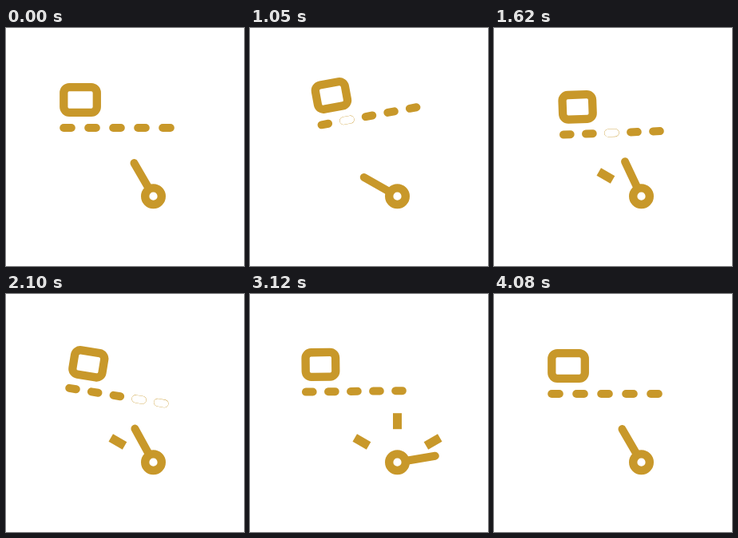
Write an HTML page with a canvas that moves like this. It is 298x298 px and loops after 4.5 s.

```html
<!DOCTYPE html>
<html lang="en">
<head>
<meta charset="utf-8">
<title>Box and gauge</title>
<style>
html, body { margin: 0; width: 100%; height: 100%; overflow: hidden; background: #fff; }
canvas { display: block; width: 100vw; height: 100vh; }
</style>
</head>
<body>
<canvas width="298" height="298"></canvas>
<script>
const ctx = document.querySelector('canvas').getContext('2d');
const GOLD = '#c8982a';
const LOOP = 4500, STEP = 30, START = 330, END = 3900;
const rad = degrees => degrees * Math.PI / 180;

const easeInOut = u => (1 - Math.cos(Math.PI * u)) / 2;
const easeIn = u => u ** 1.25;
const easeOut = u => Math.sin(Math.PI * u / 2);

// Each point is [time, value, easing on the way there].
function track(...points) {
  return t => {
    const next = points.findIndex(point => point[0] > t);
    if (next === 0) return points[0][1];
    if (next < 0) return points[points.length - 1][1];
    const [t0, v0] = points[next - 1];
    const [t1, v1, ease = easeInOut] = points[next];
    return v0 + (v1 - v0) * ease((t - t0) / (t1 - t0));
  };
}

const lineX = track([START, 139], [840, 149], [1350, 149], [2790, 130], [3540, 131], [END, 139]);
const lineY = track([START, 125], [1000, 110], [1700, 132], [1950, 132], [2430, 112], [3300, 123], [END, 125]);
const tilt = track([START, 0], [1050, -10.5], [1200, -10.5], [2130, 9.3], [2550, -5], [3300, 0]);
const squeeze = track([START, 0], [840, 1], [3360, 1], [END, 0]);
const needle = track([START, -30], [735, -93], [1740, -24, easeOut], [2040, -30],
  [2970, 93], [END, -30, easeIn]);

function line(x1, y1, x2, y2, width, color = GOLD, cap = 'round') {
  ctx.strokeStyle = color;
  ctx.lineWidth = width;
  ctx.lineCap = cap;
  ctx.beginPath();
  ctx.moveTo(x1, y1);
  ctx.lineTo(x2, y2);
  ctx.stroke();
}

function drawBoxAndLine(t) {
  const sx = 1 - .095 * squeeze(t), sy = 1 - .03 * squeeze(t);
  ctx.save();
  ctx.translate(lineX(t), lineY(t));
  ctx.rotate(rad(tilt(t)));
  ctx.strokeStyle = GOLD;
  ctx.lineWidth = 10.3;
  ctx.beginPath();
  ctx.roundRect(-66.7 * sx, -50.8 * sy, 41.5 * sx, 31.6 * sy, 7);
  ctx.stroke();
  for (let i = 0; i < 5; i++) {
    const mid = (i - 2) * 31 * sx, half = 4.8 * sx;
    line(mid - half, 0, mid + half, 0, 10);
    // The dashes are blanked one after the other, leaving a thin outline.
    const blankFrom = 390 + i * 420;
    if (t >= blankFrom && t < blankFrom + 540) line(mid - half, 0, mid + half, 0, 9.4, '#fff');
  }
  ctx.restore();
}

function drawGauge(t) {
  ctx.save();
  ctx.translate(184.5, 210.7);
  for (let i = 0; i < 3; i++) {
    // A tick shows up as the needle passes and they vanish in turn at the end.
    const from = [1080, 2340, 2700][i], to = 3720 + i * 180;
    if (t < from || t >= to) continue;
    ctx.save();
    ctx.rotate(rad((i - 1) * 60));
    line(0, -41.5, 0, -61.5, 11, GOLD, 'butt');
    ctx.restore();
  }
  ctx.save();
  ctx.rotate(rad(needle(t)));
  line(0, -12, 0, -48, 10);
  ctx.restore();
  ctx.strokeStyle = GOLD;
  ctx.lineWidth = 10.4;
  ctx.beginPath();
  ctx.arc(0, 0, 10.3, 0, 2 * Math.PI);
  ctx.stroke();
  ctx.restore();
}

function draw() {
  const t = Math.floor(performance.now() % LOOP / STEP) * STEP;
  ctx.fillStyle = '#fff';
  ctx.fillRect(0, 0, 298, 298);
  drawBoxAndLine(t);
  drawGauge(t);
  requestAnimationFrame(draw);
}
draw();
</script>
</body>
</html>
```
